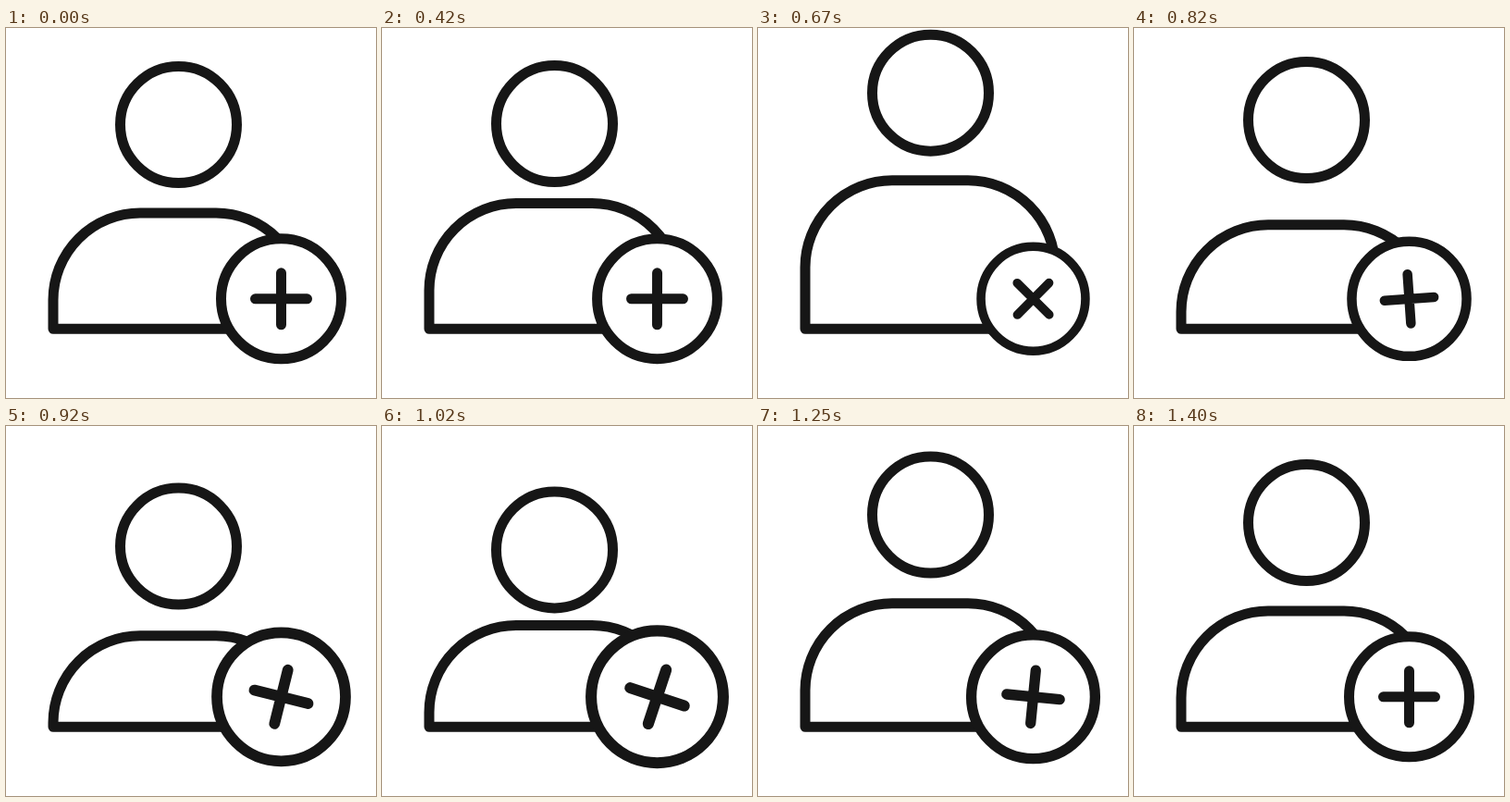
An HTML page for the animation above (1420 ms loop, 400 px wide and 400 px high).

```html
<!DOCTYPE html>
<html>
<head>
<meta charset="utf-8">
<style>
  html, body { margin: 0; width: 100%; height: 100%; overflow: hidden; background: #fff; }
  svg { display: block; width: 100%; height: 100%; }
</style>
</head>
<body>
<svg viewBox="0 0 400 400" fill="none" stroke="#161616" stroke-width="11" stroke-linecap="round" stroke-linejoin="round">
  <circle id="head" cx="186.5" r="63"/>
  <path id="body"/>
  <g id="badge">
    <circle r="65" fill="#fff"/>
    <path id="plus" d="M-28 0H28M0-28V28"/>
  </g>
</svg>
<script>
const LOOP = 1420, START = 420, END = 1400, BEAT = 294;

const [head, body, badge, plus] = ['head', 'body', 'badge', 'plus'].map(id => document.getElementById(id));

// Swings between poses on an even beat; the last swing settles at END.
function swing(t, start, beat, ...poses) {
  const last = poses.length - 2;
  const i = Math.min(last, Math.max(0, Math.floor((t - start) / beat)));
  const from = start + i * beat;
  const to = i === last ? END : from + beat;
  const p = Math.min(1, Math.max(0, (t - from) / (to - from)));
  return poses[i] + (poses[i + 1] - poses[i]) * (1 - Math.cos(Math.PI * p)) / 2;
}

function draw(now) {
  let t = now % LOOP;
  if (t < START) t = END; // rest pose until the hard start

  const headY = swing(t, 390, BEAT, 104.5, 70, 136, 95.5, 104.5);
  const top = swing(t, 322, BEAT, 200, 159, 227, 190.5, 200);
  const scale = swing(t, 403, BEAT, 1, 0.866, 1.1, 1);
  const angle = swing(t, 410, 2 * BEAT, 0, 108.5, 90);

  head.setAttribute('cy', headY);
  body.setAttribute('d', `M51 325.3V${top + 94}A94 94 0 0 1 145 ${top}H227A94 94 0 0 1 321 ${top + 94}V325.3Z`);
  badge.setAttribute('transform', `translate(297.5 292.8) scale(${scale})`);
  plus.setAttribute('transform', `rotate(${angle})`);
}

const begin = performance.now();
function tick() {
  draw(performance.now() - begin);
  requestAnimationFrame(tick);
}
tick();
</script>
</body>
</html>
```
